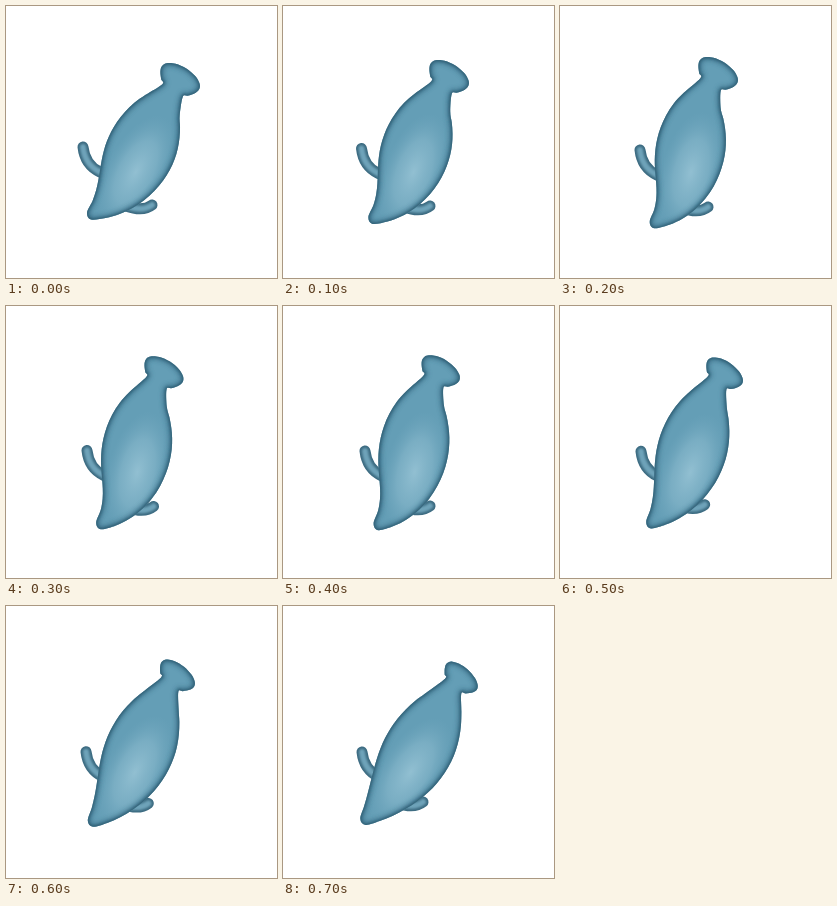
Animation of 271x272 px, one loop 800 ms. Source, as an HTML page:

```html
<!DOCTYPE html>
<html lang="en">
<head>
<meta charset="utf-8">
<title>Swimming manatee</title>
<style>
html, body { margin: 0; width: 100%; height: 100%; overflow: hidden; background: #fff; }
svg { display: block; width: 100%; height: 100%; }
</style>
</head>
<body>
<svg viewBox="0 0 271 272" preserveAspectRatio="none">
  <defs>
    <filter id="soft" x="-30%" y="-30%" width="160%" height="160%"><feGaussianBlur stdDeviation="2.4"/></filter>
    <filter id="fine" x="-30%" y="-30%" width="160%" height="160%"><feGaussianBlur stdDeviation="0.9"/></filter>
    <filter id="edge" x="-10%" y="-10%" width="120%" height="120%"><feGaussianBlur stdDeviation="0.45"/></filter>
    <radialGradient id="glow">
      <stop offset="0" stop-color="#94c1d3" stop-opacity=".95"/>
      <stop offset=".55" stop-color="#85b6ca" stop-opacity=".65"/>
      <stop offset="1" stop-color="#72a8bf" stop-opacity="0"/>
    </radialGradient>
    <path id="body"/>
    <path id="fins"/>
    <clipPath id="inside"><use href="#body"/></clipPath>
  </defs>
  <g filter="url(#edge)" fill="none" stroke-linecap="round" stroke-linejoin="round">
    <use href="#fins" stroke="#3b6a80" stroke-width="11"/>
    <use href="#fins" stroke="#6ea3b9" stroke-width="6" filter="url(#fine)"/>
    <use href="#body" fill="#649eb6"/>
    <g clip-path="url(#inside)">
      <ellipse id="shine" rx="30" ry="62" fill="url(#glow)"/>
      <use href="#body" stroke="#2f6079" stroke-width="6" opacity=".7" filter="url(#soft)"/>
      <use href="#body" stroke="#2b566b" stroke-width="2.4" opacity=".8" filter="url(#fine)"/>
    </g>
  </g>
</svg>
<script>
const STEP = 100, COUNT = 8;

// bow: sideways bend of the spine; tilt: tail angle in degrees; size: tail scale
const KEYS = [
  { snout: [83, 210], neck: [165, 87], bow: 25, tilt: 32, size: 1, left: [77, 141], right: [146, 199] },
  { snout: [92, 219], neck: [149, 81], bow: 32, tilt: 32, size: 1, left: [80, 144], right: [148, 201] },
  { snout: [93, 221], neck: [149, 78], bow: 32, tilt: 32, size: .95, left: [82, 145], right: [147, 200] },
  { snout: [80, 216], neck: [168.5, 82], bow: 14, tilt: 42, size: .85, left: [79, 146], right: [140, 196] }
];

const mix = (a, b, t) => Array.isArray(a) ? a.map((v, i) => mix(v, b[i], t)) : a + (b - a) * t;

function poseAt(k) {
  const i = Math.min(Math.floor(k), KEYS.length - 2), a = KEYS[i], b = KEYS[i + 1];
  return Object.fromEntries(Object.keys(a).map(name => [name, mix(a[name], b[name], k - i)]));
}

// half widths: trunk from snout to neck, tail from neck to outer rim
const trunk = s => 4 + 4 * s + 28.5 * Math.sin(Math.PI * s ** 1.15) ** .8;
const fan = u => (9 + 16 * Math.sin(1.9 * u)) * Math.sqrt(1 - u ** 4);

// point at distance w to the right of a heading
const beside = ([x, y], [dx, dy], w) => [x - dy * w, y + dx * w];

function spineOf({ snout: a, neck: d, bow }) {
  const axis = [(d[0] - a[0]), (d[1] - a[1])], len = Math.hypot(...axis);
  const dir = axis.map(v => v / len);
  const b = beside(mix(a, d, 1 / 3), dir, bow);
  const c = beside(mix(a, d, 2 / 3), dir, .7 * (20 - bow));
  return t => {
    const p = mix(mix(a, b, t), mix(b, c, t), t), q = mix(mix(b, c, t), mix(c, d, t), t);
    const l = Math.hypot(q[0] - p[0], q[1] - p[1]);
    return { at: mix(p, q, t), dir: [(q[0] - p[0]) / l, (q[1] - p[1]) / l] };
  };
}

function outline(pose, spine) {
  const left = [], right = [];
  const add = (p, dir, w) => {
    left.push(beside(p, dir, -w));
    right.unshift(beside(p, dir, w));
  };
  for (let s = 0; s < .96; s += .075) {
    const { at, dir } = spine(s);
    add(at, dir, trunk(s));
  }
  const turn = pose.tilt * Math.PI / 180, dir = [Math.sin(turn), -Math.cos(turn)];
  const along = u => pose.neck.map((v, k) => v + dir[k] * 29 * pose.size * u);
  for (let u = .1; u < .97; u += .12) add(along(u), dir, fan(u) * mix(.4, 1, pose.size) );
  return [...left, along(1), ...right];
}

// closed smooth curve through all points
function smooth(pts) {
  const n = pts.length, get = i => pts[(i + n) % n];
  const text = p => p.map(v => v.toFixed(2)).join(' ');
  let d = 'M' + text(pts[0]);
  for (let i = 0; i < n; i++) {
    const [a, b, c, e] = [get(i - 1), get(i), get(i + 1), get(i + 2)];
    const out = b.map((v, k) => v + (c[k] - a[k]) / 6);
    const back = c.map((v, k) => v - (e[k] - b[k]) / 6);
    d += `C${text(out)} ${text(back)} ${text(c)}`;
  }
  return d + 'Z';
}

const finPath = ({ left, right }) => `M${left}q2 18 17 25M${right}q-9 7 -26 1`;

function shapeAt(i) {
  const pose = poseAt(i < 4 ? i / 2 : 2 + (i - 4) / 3);
  const spine = spineOf(pose), { at, dir } = spine(.42);
  const [x, y] = beside(at, dir, 5);
  const angle = Math.atan2(dir[0], -dir[1]) * 180 / Math.PI;
  return {
    body: smooth(outline(pose, spine)),
    fins: finPath(pose),
    shine: `translate(${x} ${y}) rotate(${angle})`
  };
}

const shapes = Array.from({ length: COUNT }, (_, i) => shapeAt(i));
const [body, fins, shine] = ['body', 'fins', 'shine'].map(id => document.getElementById(id));
const start = performance.now();

function draw() {
  const now = shapes[Math.floor((performance.now() - start) / STEP) % COUNT];
  body.setAttribute('d', now.body);
  fins.setAttribute('d', now.fins);
  shine.setAttribute('transform', now.shine);
  requestAnimationFrame(draw);
}
draw();
</script>
</body>
</html>
```
